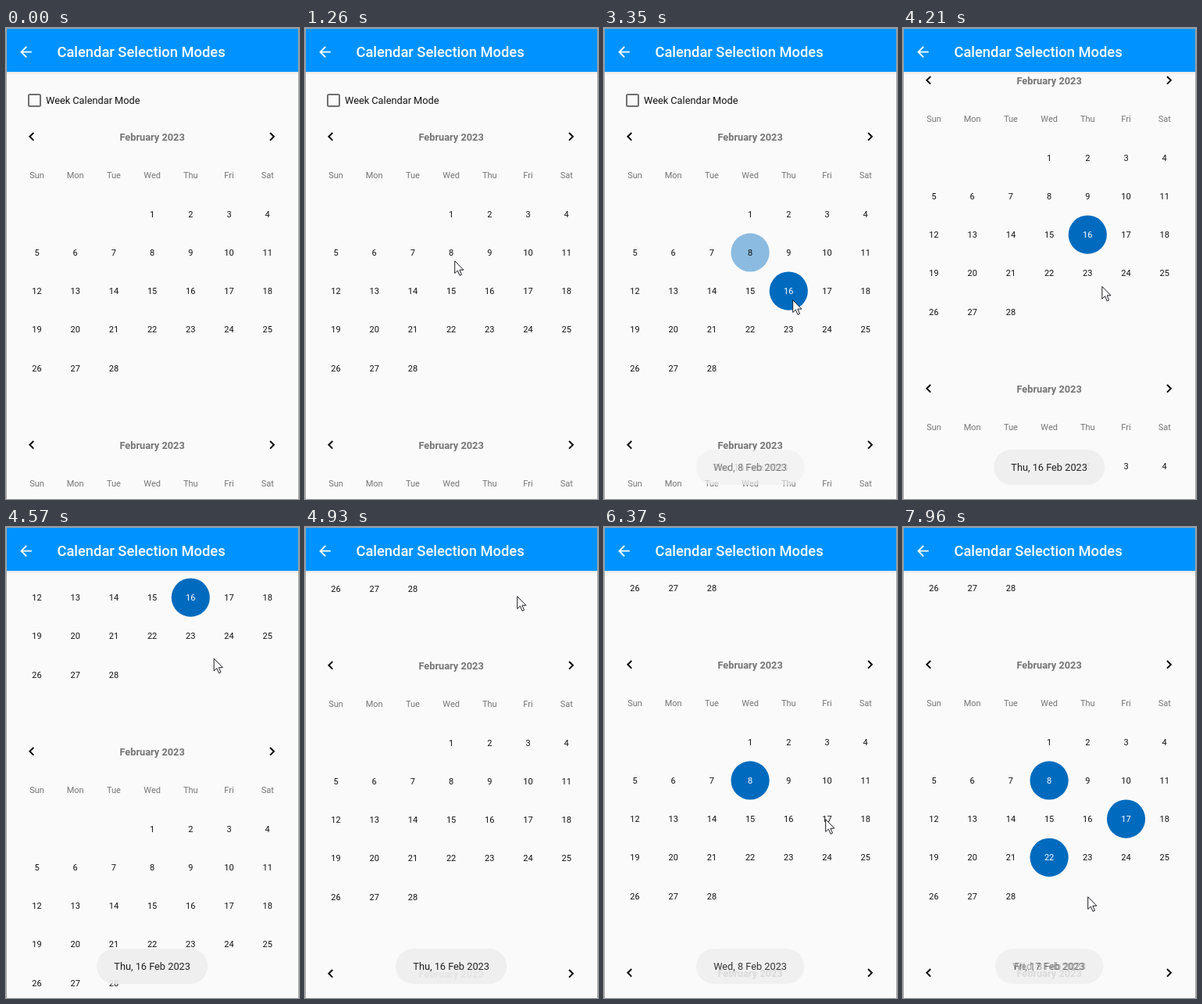
An HTML page with a canvas that plays this animation: 375x602 px, repeating every 8 s.

```html
<!DOCTYPE html>
<html lang="en">
<head>
<meta charset="utf-8">
<title>Calendar Selection Modes</title>
<style>
  html, body { margin: 0; width: 100%; height: 100%; overflow: hidden; background: #fafafa; }
  canvas { display: block; width: 375px; height: 602px; }
</style>
</head>
<body>
<canvas id="stage"></canvas>
<script>
const WIDTH = 375, HEIGHT = 602, BAR = 56, LOOP = 8000, REFRESH = 120, FADE = 300;
const CELL = 49.2, FIRST_COLUMN = 39.5, CENTER = FIRST_COLUMN + 3 * CELL, CALENDAR_HEIGHT = 394;
const ACCENT = '#006bbe', GREY = '#757575', INK = '#111';
const BODY = 12.77, SMALL = 11;
const WEEKDAYS = ['Sun', 'Mon', 'Tue', 'Wed', 'Thu', 'Fri', 'Sat'];
const ARROW_BACK = new Path2D('M20 11H7.83l5.59-5.59L12 4l-8 8 8 8 1.41-1.41L7.83 13H20v-2z');
const POINTER = new Path2D('M0 0V15.8L3.7 12.4L6.3 18.6L8.8 17.5L6.2 11.5H11.2Z');

const DRAG = { from: 3907, pointerTo: 4897, scrollTo: 4961, distance: 357 };

// The pointer eases to each place in turn and rests there.
const MOVES = [
  { from: 250, to: 390, x: 171, y: 321 },
  { from: 520, to: 880, x: 191.7, y: 297.7 },
  { from: 1260, to: 1380, x: 214, y: 315 },
  { from: 1520, to: 2000, x: 188, y: 288 },
  { from: 2360, to: 2960, x: 241.7, y: 347.7 },
  { from: 3350, to: 3610, x: 250, y: 400 },
  { from: DRAG.from, to: DRAG.pointerTo, x: 271.7, y: 88.7 },
  { from: 4960, to: 5530, x: 190, y: 325 },
  { from: 5770, to: 6250, x: 283.7, y: 373.7 },
  { from: 6610, to: 7210, x: 185, y: 424 },
  { from: 7580, to: 7900, x: 236.7, y: 472.7 }];
const SELECTIONS = [
  { calendar: 0, day: 8, from: 2120, to: 3290 },
  { calendar: 0, day: 16, from: 3350 },
  { calendar: 1, day: 8, from: 5770 },
  { calendar: 1, day: 17, from: 6610 },
  { calendar: 1, day: 22, from: 7580 }];
const TOASTS = [
  { label: 'Wed, 8 Feb 2023', from: 2480, to: 3245 },
  { label: 'Thu, 16 Feb 2023', from: 3305, to: 6010 },
  { label: 'Wed, 8 Feb 2023', from: 6100, to: 7880 },
  { label: 'Fri, 17 Feb 2023', from: 7800, to: LOOP }];

const canvas = document.getElementById('stage');
const ctx = canvas.getContext('2d');
const ratio = window.devicePixelRatio || 1;
canvas.width = WIDTH * ratio;
canvas.height = HEIGHT * ratio;

const progress = (time, from, to) => Math.min(1, Math.max(0, (time - from) / (to - from)));
const ease = u => u * u * (3 - 2 * u);
const fadeOut = (time, from, duration) => 1 - progress(time, from, from + duration);

function pointerAt(time) {
  let x = 170, y = 465;
  for (const move of MOVES) {
    const part = ease(progress(time, move.from, move.to));
    x += (move.x - x) * part;
    y += (move.y - y) * part;
  }
  return [x, y];
}

function text(string, x, y, size, color, weight = 400, align = 'center') {
  ctx.font = `${weight} ${size}px Roboto, sans-serif`;
  ctx.textAlign = align;
  ctx.fillStyle = color;
  ctx.fillText(string, x, y);
}

function chevron(x, y, direction) {
  ctx.beginPath();
  ctx.moveTo(x - 2.6 * direction, y - 4.8);
  ctx.lineTo(x + 2.3 * direction, y);
  ctx.lineTo(x - 2.6 * direction, y + 4.8);
  ctx.strokeStyle = '#000';
  ctx.lineWidth = 1.9;
  ctx.stroke();
}

function selectionAlpha(calendar, day, time) {
  const selection = SELECTIONS.find(s => s.calendar === calendar && s.day === day);
  if (!selection || time < selection.from) return 0;
  return selection.to ? fadeOut(time, selection.to, 110) : 1;
}

function drawDay(calendar, day, top, time) {
  const slot = day + 2;
  const x = FIRST_COLUMN + slot % 7 * CELL;
  const y = top + 237.7 + Math.floor(slot / 7) * CELL;
  const alpha = selectionAlpha(calendar, day, time);
  ctx.globalAlpha = alpha;
  ctx.fillStyle = ACCENT;
  ctx.beginPath();
  ctx.arc(x, y, CELL / 2, 0, 2 * Math.PI);
  ctx.fill();
  ctx.globalAlpha = 1;
  text(day, x, y + 4, SMALL, alpha > 0.5 ? '#fff' : INK);
}

function drawCalendar(index, time) {
  const top = index * CALENDAR_HEIGHT;
  chevron(32.7, top + 138.8, -1);
  chevron(340.6, top + 138.8, 1);
  text('February 2023', CENTER, top + 143.8, BODY, GREY, 700);
  WEEKDAYS.forEach((name, i) => text(name, FIRST_COLUMN + i * CELL, top + 192.2, SMALL, GREY));
  for (let day = 1; day <= 28; day++) drawDay(index, day, top, time);
}

function drawContent(time, refreshed) {
  const scroll = DRAG.distance * ease(progress(refreshed, DRAG.from, DRAG.scrollTo));
  ctx.save();
  ctx.translate(0, -Math.round(scroll));
  ctx.strokeStyle = '#707070';
  ctx.lineWidth = 2;
  ctx.beginPath();
  ctx.roundRect(29, 85, 15, 15, 1.5);
  ctx.stroke();
  text('Week Calendar Mode', 51, 97.3, BODY, INK, 400, 'left');
  for (let i = 0; i < 3; i++) drawCalendar(i, time);
  ctx.restore();
}

function drawAppBar() {
  const shadow = ctx.createLinearGradient(0, BAR, 0, BAR + 4);
  shadow.addColorStop(0, 'rgba(0,0,0,.08)');
  shadow.addColorStop(1, 'rgba(0,0,0,0)');
  ctx.fillStyle = shadow;
  ctx.fillRect(0, BAR, WIDTH, 4);
  ctx.fillStyle = '#0093ff';
  ctx.fillRect(0, 0, WIDTH, BAR);
  ctx.save();
  ctx.translate(14.6, 19.7);
  ctx.scale(0.912, 0.912);
  ctx.fillStyle = '#fff';
  ctx.fill(ARROW_BACK);
  ctx.restore();
  text('Calendar Selection Modes', 65.4, 37.4, 18.35, '#fff', 500, 'left');
}

function drawToast({ label, from, to }, time) {
  const opacity = progress(time, from, from + FADE) * fadeOut(time, to, FADE);
  if (!opacity) return;
  ctx.font = `400 ${BODY}px Roboto, sans-serif`;
  const width = ctx.measureText(label).width + 44.5;
  ctx.globalAlpha = opacity * 0.92;
  ctx.fillStyle = '#eee';
  ctx.beginPath();
  ctx.roundRect(CENTER - width / 2, 539, width, 45, 22.5);
  ctx.fill();
  ctx.globalAlpha = opacity;
  text(label, CENTER, 566, BODY, '#212121');
  ctx.globalAlpha = 1;
}

function drawPointer(time) {
  if (time < MOVES[0].from) return;
  ctx.save();
  ctx.translate(...pointerAt(time));
  ctx.fillStyle = '#fff';
  ctx.strokeStyle = '#1a1a24';
  ctx.lineWidth = 1;
  ctx.fill(POINTER);
  ctx.stroke(POINTER);
  ctx.restore();
}

function draw(time) {
  const refreshed = Math.floor((time - 10) / REFRESH) * REFRESH + 10;
  ctx.setTransform(ratio, 0, 0, ratio, 0, 0);
  ctx.fillStyle = '#fafafa';
  ctx.fillRect(0, 0, WIDTH, HEIGHT);
  drawContent(time, refreshed);
  drawAppBar();
  TOASTS.forEach(toast => drawToast(toast, time));
  ctx.strokeStyle = '#a3a3a3';
  ctx.lineWidth = 1;
  ctx.strokeRect(0.5, 0.5, WIDTH - 1, HEIGHT + 1);
  drawPointer(refreshed);
}

const began = performance.now();
function tick() {
  draw((performance.now() - began) % LOOP);
  requestAnimationFrame(tick);
}
tick();
</script>
</body>
</html>
```
